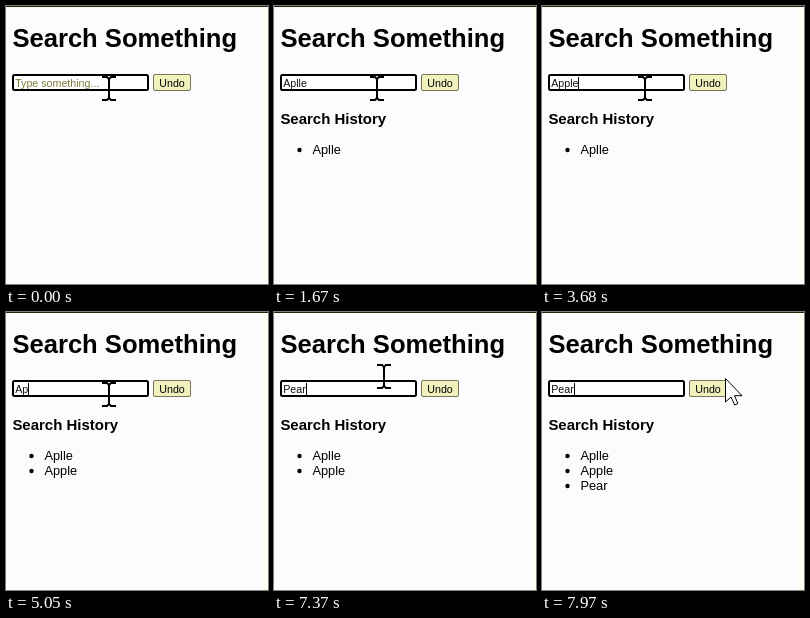
An HTML page for the animation above (8 s loop, 262 by 278 pixels).

```html
<!DOCTYPE html>
<html lang="en">
<head>
<meta charset="utf-8">
<title>Search Something</title>
<style>
  html, body { margin: 0; width: 100%; height: 100%; overflow: hidden; background: #fcfcff; }
  svg { display: block; width: 262px; height: 278px; font-family: "Liberation Sans", Arial, sans-serif; }
  .h1 { font-size: 25.6px; font-weight: bold; }
  .h3 { font-size: 14.98px; font-weight: bold; }
  .li { font-size: 12.8px; }
  .ui { font-size: 10.667px; }
</style>
</head>
<body>
<svg viewBox="0 0 262 278">
  <rect width="262" height="278" fill="#fcfcff"/>
  <rect x="256" width="6" height="278" fill="#fefef4"/>
  <rect width="262" height="1" fill="#22220a"/>
  <text class="h1" x="6.4" y="41">Search Something</text>

  <rect x="7" y="69" width="135" height="15" rx="1.5" fill="#fff" stroke="#000" stroke-width="2"/>
  <text class="ui" id="hint" x="9.2" y="81" fill="#7c7c3c">Type something...</text>
  <text class="ui" id="field" x="9.2" y="81" fill="#111"></text>
  <rect id="caret" y="71" width="1" height="12"/>

  <rect x="147.5" y="68.5" width="37" height="16" rx="1.5" fill="#f1f1bd" stroke="#777755"/>
  <text class="ui" x="153.3" y="81">Undo</text>

  <g id="history">
    <text class="h3" x="6.4" y="118">Search History</text>
    <g id="list"></g>
  </g>

  <g id="beam">
    <path d="M-7-11.5H-2L0-9.5L2-11.5H7M-7 11.5H-2L0 9.5L2 11.5H7M0-10V10" fill="none" stroke="#000" stroke-width="2"/>
  </g>
  <path id="arrow" d="M0 0V23.5L5.5 18.5L9.2 26.5L12.4 25L9 17.2H16.5Z" fill="#fff" stroke="#000"/>
</svg>
<script>
const LOOP = 8000, BLINK = 530;
const $ = id => document.getElementById(id);

// Field contents by time
const edits = [
  [40, ""], [300, "A"], [610, "Ap"], [840, "Apl"], [990, "Apll"], [1100, "Aplle"],
  [2050, "Apll"], [2200, "Apl"], [2510, "Ap"], [2700, "A"], [2920, "Ap"],
  [3300, "App"], [3490, "Appl"], [3680, "Apple"],
  [4670, "Appl"], [4860, "App"], [5050, "Ap"], [5200, "A"], [5280, ""],
  [6490, "P"], [6720, "Pe"], [6820, "Pea"], [6910, "Pear"]
];
const entries = [[1670, "Aplle"], [4250, "Apple"], [7480, "Pear"]];

const svgEl = (tag, attrs, parent) => {
  const el = document.createElementNS("http://www.w3.org/2000/svg", tag);
  for (const k in attrs) el.setAttribute(k, attrs[k]);
  return parent.appendChild(el);
};

const rows = entries.map(([at, word], i) => {
  const g = svgEl("g", {}, $("list")), y = 148 + i * 15;
  svgEl("circle", { cx: 25.5, cy: y - 4, r: 2.2 }, g);
  svgEl("text", { class: "li", x: 38.4, y }, g).textContent = word;
  return { at, g };
});

const show = (el, on) => el.setAttribute("visibility", on ? "visible" : "hidden");
const place = (el, x, y) => el.setAttribute("transform", `translate(${x} ${y})`);

function pointer(t) {
  if (t < 7370) return [103, 82.5];
  const p = Math.min(1, (t - 7370) / 600);
  const e = p * p * (3 - 2 * p);
  return [110 + 74 * e, 64.5 + 1.5 * e];
}

function draw(t) {
  let [since, word] = [0, ""];
  for (const [at, w] of edits) if (t >= at) [since, word] = [at, w];
  $("field").textContent = word;
  show($("hint"), !word);
  const width = word ? $("field").getComputedTextLength() : 0;
  $("caret").setAttribute("x", Math.round(9.2 + width));
  show($("caret"), t >= 40 && Math.floor((t - since) / BLINK) % 2 === 0);

  show($("history"), t >= entries[0][0]);
  for (const { at, g } of rows) show(g, t >= at);

  const [x, y] = pointer(t), over = x < 143;
  place($("beam"), Math.round(x), y);
  place($("arrow"), Math.round(x) - 0.5, y + 0.5);
  show($("beam"), over);
  show($("arrow"), !over);
}

const start = performance.now();
function tick() {
  draw((performance.now() - start) % LOOP);
  requestAnimationFrame(tick);
}
draw(0);
requestAnimationFrame(tick);
</script>
</body>
</html>
```
